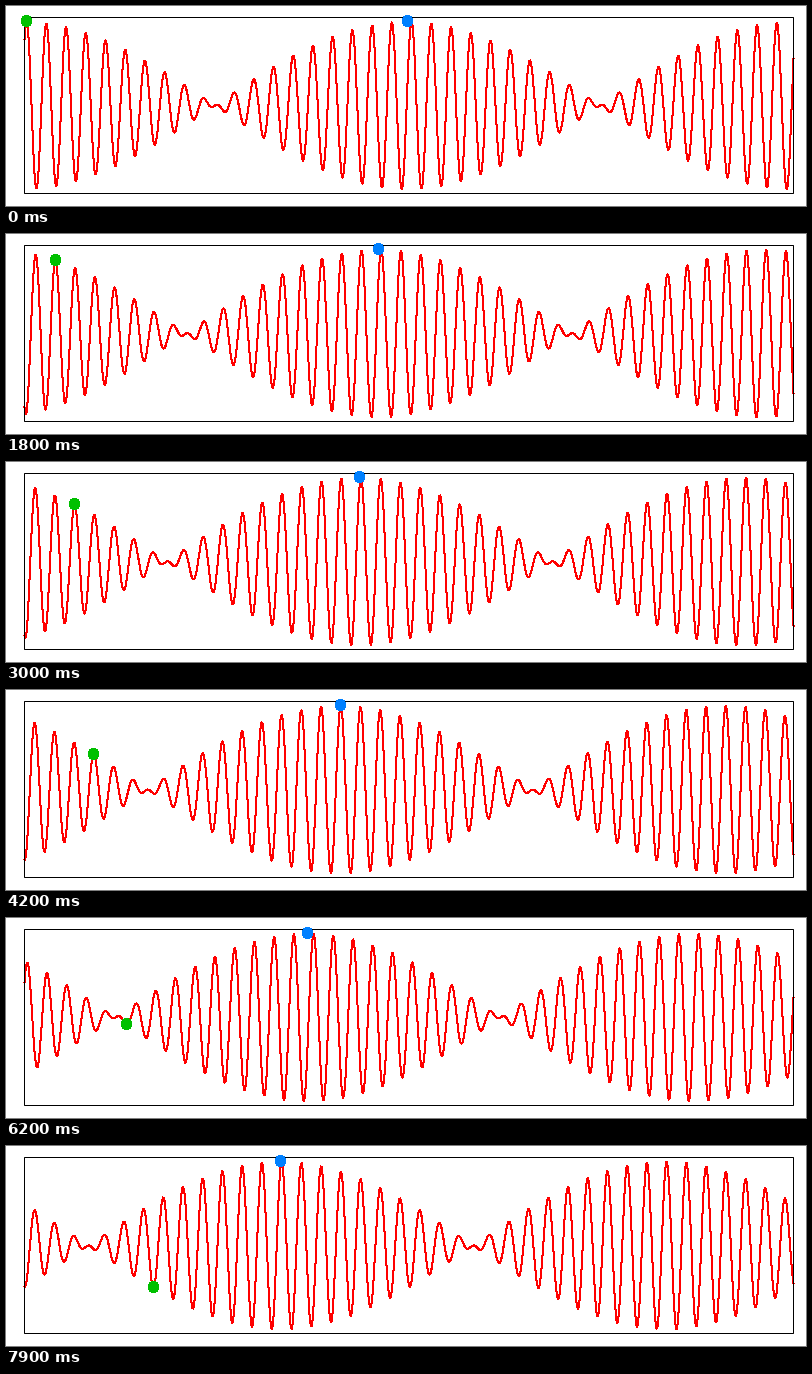
Write a matplotlib script that moves like this. It is 800x200 px and loops after 8 s.

```python
import numpy as np
import matplotlib.pyplot as plt
from matplotlib.animation import FuncAnimation
from matplotlib.patches import Ellipse, Rectangle

W, H, DPI = 800, 200, 100
LEFT, TOP, RIGHT, BOTTOM = 18, 11, 787, 187
SPAN, MID = RIGHT - LEFT + 1, (TOP + BOTTOM) / 2
AMP = (BOTTOM - TOP) / 2 / 1.05
PERIOD, START, FRAMES = 240, 1.3, 80
PX = 72 / DPI

fig = plt.figure(figsize=(W / DPI, H / DPI), dpi=DPI, facecolor="white")
ax = fig.add_axes([0, 0, 1, 1])
ax.set(xlim=(0, W), ylim=(H, 0))
ax.axis("off")

# Without antialiasing every touched pixel is filled, which adds about 1 px.
x = np.linspace(0, 1 - 1 / SPAN, 1000)
curve, = ax.plot([], [], color="#ff0000", lw=PX, antialiased=False, zorder=1)
ax.add_patch(Rectangle((LEFT, TOP), RIGHT - LEFT, BOTTOM - TOP, fill=False,
                       ec="black", lw=PX, snap=True, zorder=2))


def dot(color):
    return ax.add_patch(Ellipse((0, 0), 10.6, 11.2, fc=color, lw=0,
                                antialiased=False, zorder=3))


phase_dot, group_dot = dot("#00c000"), dot("#0080ff")


def wave(u, t):
    """Two waves with frequency proportional to 1/k: the group runs backwards."""
    a = np.cos(2 * np.pi * (38 * u - 20 * t))
    b = np.cos(2 * np.pi * (40 * u - 19 * t))
    return (a + b) / 2


def place(patch, u, level):
    patch.center = (round(LEFT + SPAN * u) + 0.5, round(MID - AMP * level))


def update(i):
    t = (i + START) / PERIOD
    curve.set_data(LEFT + 0.5 + SPAN * x, MID + 0.5 - AMP * wave(x, t))
    place(phase_dot, t / 2, wave(t / 2, t))
    place(group_dot, (1 - t) / 2, 1)
    return curve, phase_dot, group_dot


anim = FuncAnimation(fig, update, frames=FRAMES, interval=100, repeat=True,
                     repeat_delay=0, blit=False)
plt.show()
```
